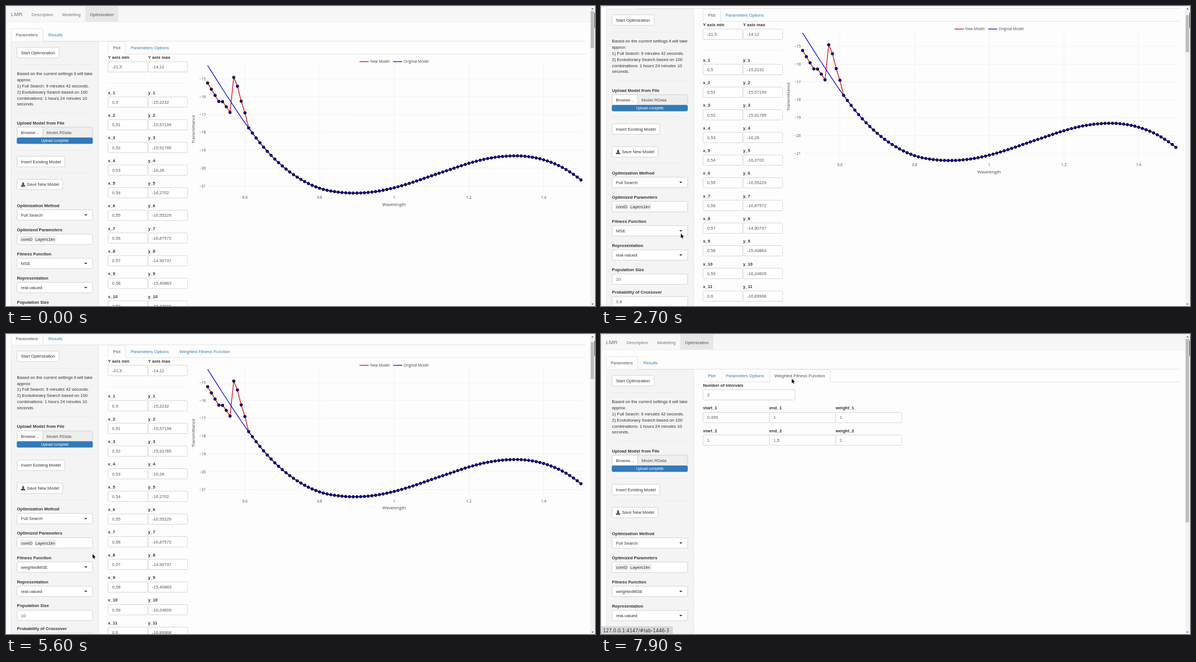
An HTML page with a canvas for the animation above (8000 ms loop, 1048 by 534 pixels).

```html
<!DOCTYPE html>
<html lang="en">
<head>
<meta charset="utf-8">
<style>
html, body { margin: 0; width: 100%; height: 100%; overflow: hidden; background: #fdfdfd; }
canvas { display: block; width: 1048px; height: 534px; }
</style>
</head>
<body>
<canvas id="stage" width="1048" height="534"></canvas>
<script>
const ctx = document.getElementById('stage').getContext('2d');
const W = 1048, H = 534, LOOP = 8000, STEP = 100;
const SANS = '"Liberation Sans", Arial, sans-serif';
const PLOT = '"Open Sans", sans-serif';
const PAPER = '#fdfdfd', LINK = '#337ab7', INK = '#333', BORDER = '#ccc';
const SIZE = 7.63, ROW = 40.33;

// Moments of the user's actions, in ms
const OPEN = 2900, PICK = 4200, SWITCH = 7500;
const CURSOR_PATH = [
  [1150, 232, 534], [1450, 158.5, 431], [2300, 158.5, 431], [2800, 140, 402],
  [3100, 140, 402], [3600, 68.5, 439], [4300, 68.5, 439], [4900, 154, 391.5],
  [5900, 154, 391.5], [6700, 339.5, 79.5], [8000, 339.5, 79.5]
];

const clamp = v => Math.max(0, Math.min(1, v));
const ease = v => { v = clamp(v); return v * v * (3 - 2 * v); };

function scrollAt(t) {
  return 58 * (ease((t - 1615) / 425) - ease((t - 5465) / 410));
}

function cursorAt(t) {
  if (t < CURSOR_PATH[0][0]) return null;
  const i = CURSOR_PATH.findIndex(k => k[0] > t);
  const [t0, x0, y0] = CURSOR_PATH[i - 1], [t1, x1, y1] = CURSOR_PATH[i];
  const p = ease((t - t0) / (t1 - t0));
  return { x: x0 + (x1 - x0) * p, y: y0 + (y1 - y0) * p };
}

function rect(x, y, w, h, color) {
  ctx.fillStyle = color;
  ctx.fillRect(x, y, w, h);
}

function rule(x0, y0, x1, y1, color, width = 0.8) {
  ctx.strokeStyle = color;
  ctx.lineWidth = width;
  ctx.beginPath();
  ctx.moveTo(x0, y0);
  ctx.lineTo(x1, y1);
  ctx.stroke();
}

function box(x0, y0, x1, y1, fill = '#fff', stroke = BORDER, r = 2.2) {
  ctx.beginPath();
  ctx.roundRect(x0, y0, x1 - x0, y1 - y0, r);
  ctx.fillStyle = fill;
  ctx.fill();
  ctx.strokeStyle = stroke;
  ctx.lineWidth = 0.8;
  ctx.stroke();
}

function polygon(points, fill, stroke, width = 0.8) {
  ctx.beginPath();
  points.forEach(([x, y]) => ctx.lineTo(x, y));
  ctx.closePath();
  if (stroke) {
    ctx.strokeStyle = stroke;
    ctx.lineWidth = width;
    ctx.stroke();
  }
  ctx.fillStyle = fill;
  ctx.fill();
}

// y is the middle of the capital letters
function text(str, x, y, { color = INK, size = SIZE, bold = false, align = 'left', font = SANS } = {}) {
  ctx.font = `${bold ? 'bold ' : ''}${size}px ${font}`;
  ctx.fillStyle = color;
  ctx.textAlign = align;
  ctx.fillText(str, x, y + size * 0.36);
}

const label = (str, x, y) => text(str, x, y, { bold: true });

function field(str, x0, x1, y) {
  box(x0, y - 9.2, x1, y + 9.2);
  text(str, x0 + 7.2, y, { color: '#555' });
}

function caret(x, y, dir = 1) {
  polygon([[x - 2.7, y - 1.3 * dir], [x + 2.7, y - 1.3 * dir], [x, y + 1.5 * dir]], INK);
}

function select(title, value, y) {
  label(title, 19.6, y - 17);
  box(19.6, y - 9.2, 154, y + 9.2);
  text(value, 26.7, y);
  caret(142, y);
}

function button(str, x1, y, textX = 26.6) {
  box(19.6, y - 9.3, x1, y + 9.3);
  text(str, textX, y);
}

function tabFrame(x0, x1, top, bottom) {
  rect(x0, top, x1 - x0, bottom - top + 1, PAPER);
  ctx.beginPath();
  ctx.moveTo(x0, bottom);
  ctx.lineTo(x0, top + 2);
  ctx.quadraticCurveTo(x0, top, x0 + 2, top);
  ctx.lineTo(x1 - 2, top);
  ctx.quadraticCurveTo(x1, top, x1, top + 2);
  ctx.lineTo(x1, bottom);
  ctx.strokeStyle = '#ddd';
  ctx.lineWidth = 0.8;
  ctx.stroke();
}

function drawNavbar() {
  rect(0, 0, W, 28, '#f7f7f7');
  rect(141, 0, 59, 28, '#e7e7e7');
  rule(0, 28, W, 28, '#e7e7e7');
  text('LMR', 8.7, 14.8, { size: 9.8, color: '#777' });
  text('Description', 45.6, 14.8, { color: '#777' });
  text('Modelling', 100, 14.8, { color: '#777' });
  text('Optimization', 149.4, 14.8, { color: '#555' });
  rule(9, 62.5, 1031, 62.5, '#ddd');
  tabFrame(9, 65.5, 40, 62.5);
  text('Parameters', 17.2, 51.2, { color: '#555' });
  text('Results', 75.4, 51.2, { color: LINK });
}

function drawDownloadIcon(x, y) {
  rect(x + 2.6, y - 3.8, 2.2, 3, INK);
  polygon([[x + 0.9, y - 1], [x + 6.5, y - 1], [x + 3.7, y + 1.8]], INK);
  rect(x, y + 1.6, 7.4, 2.2, INK);
}

function drawSidebar(state) {
  box(9, 63.2, 165, 900, '#f4f4f4', '#e3e3e3');
  button('Start Optimization', 94.3, 83);
  ['Based on the current settings it will take', 'approx:', '1) Full Search: 9 minutes 42 seconds.',
    '2) Evolutionary Search based on 100', 'combinations: 1 hours 24 minutes 10', 'seconds.'
  ].forEach((line, i) => text(line, 19.6, 120.2 + i * 10.9));
  [104.5, 191, 256.5, 297, 338].forEach(y => rule(19.6, y, 154, y, '#e9e9e9'));

  label('Upload Model from File', 19.6, 207.8);
  box(19.6, 215.8, 154, 234.3, '#eee');
  box(19.6, 215.8, 65, 234.3);
  text('Browse...', 26.6, 225.2);
  text('Model.RData', 72, 225.2, { color: '#555' });
  box(19.6, 234.6, 154, 245, LINK, LINK, 2);
  text('Upload complete', 87, 240, { size: 6.54, color: '#fff', align: 'center' });

  button('Insert Existing Model', 104.5, 277);
  button('Save New Model', 101, 317.7, 37);
  drawDownloadIcon(26.7, 317.7);

  select('Optimization Method', 'Full Search', 372);
  label('Optimized Parameters', 19.6, 398);
  box(19.6, 405.9, 154, 424.3);
  rect(25, 409.3, 23.5, 11.6, '#eee');
  rect(50.3, 409.3, 39.2, 11.6, '#eee');
  text('coreD', 26.7, 415.2);
  text('Layers1lm', 52, 415.2);
  select('Fitness Function', state.fitness, 458.2);
  select('Representation', 'real-valued', 501.3);
  label('Population Size', 19.6, 527);
  field('10', 19.6, 154, 544.2);
  label('Probability of Crossover', 19.6, 567.3);
  field('0,8', 19.6, 154, 584.6);
  if (state.open) drawDropdown(state.choice);
}

function drawDropdown(choice) {
  ctx.save();
  ctx.shadowColor = 'rgba(102,175,233,.6)';
  ctx.shadowBlur = 4;
  box(19.6, 449, 154, 467.6, '#fff', '#66afe9');
  ctx.restore();
  text('MSE', 26.7, 458.2);
  rule(44.3, 454, 44.3, 462.4, INK, 0.6);
  caret(142, 458, -1);
  ctx.save();
  ctx.shadowColor = 'rgba(0,0,0,.2)';
  ctx.shadowBlur = 5;
  ctx.shadowOffsetY = 2.5;
  box(19.8, 468.8, 154, 503, '#fff', '#d0d0d0');
  ctx.restore();
  rect(20.2, choice ? 486.2 : 471.8, 133.4, 14.4, '#f3f3f3');
  text('MSE', 26.7, 479.1);
  text('weightedMSE', 26.7, 493.5);
}

function drawTabs(state) {
  rule(181.5, 85.3, 1031, 85.3, '#ddd');
  if (state.hoverTab) rect(300, 63.3, 107.5, 22, '#eee');
  if (state.weighted) tabFrame(300, 407.8, 63.2, 85.3);
  else tabFrame(181.6, 212.8, 63.2, 85.3);
  text('Plot', 190.4, 74.2, { color: state.weighted ? LINK : '#555' });
  text('Parameters Options', 222, 74.2, { color: LINK });
  if (state.thirdTab) {
    text('Weighted Fitness Function', 308.4, 74.2, { color: state.weighted ? '#555' : LINK });
  }
}

function drawIntervals() {
  label('Number of intervals', 181.6, 91.2);
  field('2', 181.6, 345, 108.3);
  const rows = [['0,499', '1', '1'], ['1', '1,5', '1']];
  rows.forEach((row, r) => row.forEach((value, c) => {
    const x = 181.6 + c * 118, y = 148.7 + r * ROW;
    label(`${['start', 'end', 'weight'][c]}_${r + 1}`, x, y - 17.2);
    field(value, x, x + 118, y);
  }));
}

const edited = ['15,2232', '15,57199', '15,91785', '16,26', '16,2702', '16,55229', '16,87572',
  '14,90737', '15,40883', '16,24609', '16,89968'];

function drawPointFields() {
  label('Y axis min', 181.6, 91.2);
  label('Y axis max', 252.7, 91.2);
  field('-21,5', 181.6, 252.3, 108.3);
  field('-14,12', 252.7, 323, 108.3);
  rule(181.6, 137, 323, 137, '#eee');
  edited.forEach((value, i) => {
    const y = 171.1 + i * ROW;
    label(`x_${i + 1}`, 181.6, y - 17.2);
    label(`y_${i + 1}`, 252.7, y - 17.2);
    field(String((50 + i) / 100).replace('.', ','), 181.6, 252.3, y);
    field('-' + value, 252.7, 323, y);
  });
}

const plotX = v => 358.7 + (v - 0.5) * 664.3;
const plotY = v => 130 - (v + 15) * 31.7;

// Heights of the smooth curve, one every 0.05 of wavelength
const knots = [106, 158, 207.8, 251.3, 284.7, 308.7, 324.4, 331.3, 333, 330.3, 323.5,
  313.7, 302.2, 291, 280, 271.6, 267.3, 267.5, 273.8, 287.3, 309.7];

function curveY(i) {
  const k = Math.min(Math.floor(i / 5), knots.length - 2), u = i / 5 - k;
  const b = knots[k], c = knots[k + 1];
  const a = knots[k - 1] ?? 2 * b - c, d = knots[k + 2] ?? 3 * c - 3 * b + a;
  return b + 0.5 * u * (c - a + u * (2 * a - 5 * b + 4 * c - d + u * (3 * (b - c) + d - a)));
}

const original = Array.from({ length: 101 }, (_, i) => [plotX(0.5 + i / 100), curveY(i)]);
const edit = original.map(([x, y], i) => [x, i < edited.length ? plotY(-edited[i].replace(',', '.')) : y]);

function polyline(points, color) {
  ctx.beginPath();
  points.forEach(([x, y]) => ctx.lineTo(x, y));
  ctx.strokeStyle = color;
  ctx.lineWidth = 1.25;
  ctx.lineJoin = 'round';
  ctx.stroke();
}

function drawPlot() {
  const tick = { size: 6.54, font: PLOT, color: '#444' };
  for (let v = -15; v >= -21; v--) {
    rule(358.7, plotY(v), 1027, plotY(v), '#eee', 0.7);
    text('−' + -v, 355.5, plotY(v), { ...tick, align: 'right' });
  }
  for (let v = 6; v <= 14; v += 2) {
    const x = plotX(v / 10);
    rule(x, 104, x, 333, '#eee', 0.7);
    text(String(v / 10), x, 341, { ...tick, align: 'center' });
  }
  const title = { size: SIZE, font: PLOT, color: '#444', align: 'center' };
  text('Wavelength', 690.7, 353, title);
  ctx.save();
  ctx.translate(333, 219.3);
  ctx.rotate(-Math.PI / 2);
  text('Transmittance', 0, 0, title);
  ctx.restore();

  rule(629, 99, 645.5, 99, '#d80000', 1.25);
  text('New Model', 648, 99, tick);
  rule(688.8, 99, 705, 99, '#0000d8', 1.25);
  text('Original Model', 707.5, 99, tick);

  polyline(edit, '#d80000');
  polyline(original, '#0000d8');
  ctx.fillStyle = '#0000a8';
  ctx.strokeStyle = '#000';
  ctx.lineWidth = 0.9;
  for (const [x, y] of edit) {
    ctx.beginPath();
    ctx.arc(x, y, 2.4, 0, 7);
    ctx.fill();
    ctx.stroke();
  }
}

function drawScrollbar(scroll, weighted) {
  const pageHeight = weighted ? 848 : 4190, track = 518;
  rect(1039.5, 0, 8.5, H, '#f2f2f2');
  rect(1040.3, 9 + scroll * track / pageHeight, 6, H * track / pageHeight, '#bdbdbd');
  polygon([[1041.5, 6], [1045.5, 6], [1043.5, 3.8]], '#555');
  polygon([[1041.5, 529.8], [1045.5, 529.8], [1043.5, 532]], '#555');
  rect(1047, 12, 1, 27, '#4a4a4a');
}

function drawCursor({ x, y }, hand) {
  ctx.save();
  ctx.translate(x, y);
  ctx.lineJoin = 'round';
  const shape = hand
    ? [[-0.8, 0], [0.6, 0], [0.8, 3], [4.6, 3.8], [5.4, 4.8], [4.8, 7.2], [4.4, 9], [-0.2, 9],
      [-2.8, 5.6], [-2.4, 4.6], [-0.9, 5.4]]
    : [[0, 0], [0, 8], [1.8, 6.4], [3.1, 9.2], [4.3, 8.6], [3.1, 5.9], [5.6, 5.7]];
  polygon(shape, '#111', '#fff', 1.4);
  ctx.restore();
}

function drawStatus() {
  rect(0, 521, 127, 13, '#d9d9d9');
  rule(0, 521, 127, 521, '#c4c4c4');
  rule(127, 521, 127, H, '#c4c4c4');
  text('127.0.0.1:4147/#tab-1446-3', 3.6, 528, { size: 8.2, font: '"DejaVu Sans", sans-serif' });
}

function draw(t) {
  const scroll = scrollAt(t), cursor = cursorAt(t);
  const overTab = t > 5900 && cursor.x > 300 && cursor.y > 63 && cursor.y < 85;
  const state = {
    open: t >= OPEN && t < PICK,
    choice: cursor && cursor.y > 428 ? 1 : 0,
    fitness: t >= PICK ? 'weightedMSE' : 'MSE',
    thirdTab: t >= PICK + 100,
    weighted: t >= SWITCH
  };
  state.hoverTab = overTab && !state.weighted;

  rect(0, 0, W, H, PAPER);
  ctx.save();
  ctx.translate(0, -scroll);
  drawNavbar();
  drawSidebar(state);
  drawTabs(state);
  if (state.weighted) {
    drawIntervals();
  } else {
    drawPointFields();
    drawPlot();
  }
  ctx.restore();

  rule(0, 0.5, W, 0.5, '#e6e6e6', 1);
  rule(0.5, 0, 0.5, H, '#e9e9e9', 1);
  drawScrollbar(scroll, state.weighted);
  if (overTab) drawStatus();
  if (cursor) drawCursor(cursor, state.hoverTab || (state.open && cursor.y > 411));
}

const start = performance.now();
function frame() {
  const t = (performance.now() - start) % LOOP;
  draw(Math.floor(t / STEP) * STEP);
  requestAnimationFrame(frame);
}
frame();
</script>
</body>
</html>
```
